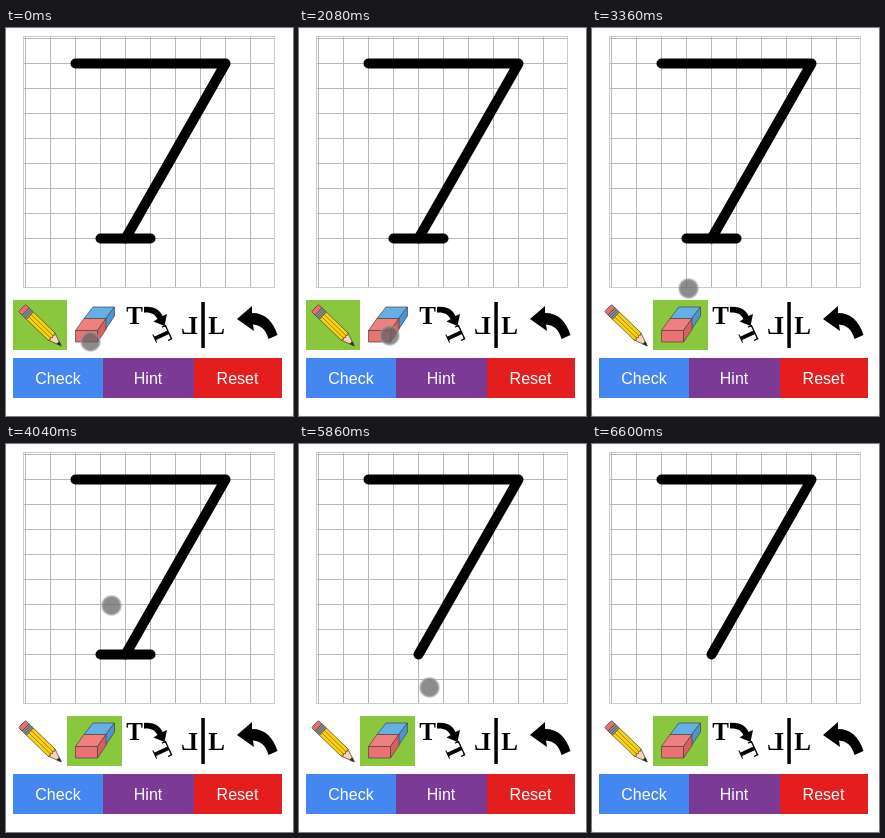
Recreate the animation shown at these times as an HTML page. Size 287x388 px, loop 8190 ms.

```html
<!DOCTYPE html>
<html lang="en">
<head>
<meta charset="utf-8">
<title>Grid drawing tool</title>
<style>
  html, body { margin: 0; width: 100%; height: 100%; overflow: hidden; background: #eee; }
  svg { display: block; width: 287px; height: 388px; }
  .label { font: 16px "Liberation Sans", Arial, sans-serif; fill: #fff; text-anchor: middle; }
  .glyph { font: bold 25px "Liberation Serif", "Times New Roman", serif; text-anchor: middle; }
  .ink { fill: none; stroke: #000; stroke-width: 10; stroke-linecap: round; stroke-linejoin: round; }
  .edge { stroke: #444; stroke-width: .7; stroke-linejoin: round; }

  .anim { animation: 8190ms step-end infinite; }
  #pencil-bg { animation-name: pencil; }
  #eraser-bg { animation-name: eraser; }
  #foot { animation-name: foot; }
  #touch { animation-name: touch; }
  #press { animation-name: press; }

  @keyframes pencil {
    0% { fill: #8bc63f; }
    32.967%, 100% { fill: #fff; }
  }
  @keyframes eraser {
    0% { fill: #fff; }
    31.501% { fill: #dcdcdc; }
    32.967%, 100% { fill: #8bc63f; }
  }
  @keyframes foot {
    0% { opacity: 1; }
    62.026%, 100% { opacity: 0; }
  }
  @keyframes press {
    0% { opacity: 0; }
    31.501% { opacity: .55; }
    32.967%, 100% { opacity: 0; }
  }
  @keyframes touch {
    0% { transform: translate(84.5px, 313.5px); }
    1.587% { transform: translate(87.5px, 305.5px); }
    9.523% { transform: translate(87.5px, 310.5px); }
    25.396% { transform: translate(90.5px, 307.5px); }
    /* up to the board */
    41.025% { transform: translate(96.5px, 260.5px); }
    42.490% { transform: translate(103.5px, 221.5px); }
    44.322% { transform: translate(109.5px, 186.5px); }
    46.153% { transform: translate(111.5px, 172px); }
    47.619% { transform: translate(111.5px, 163px); }
    /* down across the short stroke */
    49.328% { transform: translate(105.5px, 161.5px); }
    50.793% { transform: translate(103px, 166px); }
    52.258% { transform: translate(102px, 176px); }
    53.724% { transform: translate(101.5px, 190px); }
    55.189% { transform: translate(101.5px, 206px); }
    56.654% { transform: translate(101.5px, 222px); }
    58.119% { transform: translate(101.5px, 234.5px); }
    62.026% { transform: translate(107.5px, 226.5px); }
    /* off the bottom */
    71.550% { transform: translate(130.5px, 243.5px); }
    73.260% { transform: translate(134px, 257px); }
    74.725% { transform: translate(143px, 282px); }
    76.190% { transform: translate(155px, 313px); }
    77.655% { transform: translate(167px, 348px); }
    79.120% { transform: translate(176.5px, 379px); }
    80.586%, 100% { transform: translate(180px, 420px); }
  }
</style>
</head>
<body>
<svg viewBox="0 0 287 388">
  <defs>
    <pattern id="grid" x="19" y="10" width="25" height="25" patternUnits="userSpaceOnUse">
      <path d="M.5 0V25M0 .5H25" fill="none" stroke="#b8b8b8"/>
    </pattern>
  </defs>
  <rect width="287" height="388" rx="4" fill="#fff"/>

  <!-- board -->
  <rect x="18" y="9" width="250" height="250" fill="url(#grid)"/>
  <rect x="17.5" y="8.5" width="251" height="251" fill="none" stroke="#ccc"/>
  <path class="ink" d="M69.5 35.5H219.5L119.5 210.5"/>
  <path class="ink anim" id="foot" d="M94.5 210.5H144.5"/>

  <!-- tool backgrounds -->
  <rect class="anim" id="pencil-bg" x="7" y="272" width="54" height="50"/>
  <rect class="anim" id="eraser-bg" x="61" y="272" width="55" height="50"/>

  <!-- pencil -->
  <g class="edge" transform="translate(16 280) rotate(44)">
    <path d="M5-5H1.5Q0-5 0-3.5V3.5Q0 5 1.5 5H5Z" fill="#ea6d6d"/>
    <path d="M5-5H11V5H5Z" fill="#8d9296"/>
    <path d="M7-5V5M9-5V5" fill="none"/>
    <path d="M41-5L54.500 0L41 5Z" fill="#f6d5b0"/>
    <path d="M50-1.700L54.500 0L50 1.700Z" fill="#222"/>
    <path d="M11-5H41L42.500-3.300L41-1.700L42.500 0L41 1.700L42.500 3.300L41 5H11Z" fill="#fbd20c"/>
    <path d="M11-1.700H41M11 1.700H41" fill="none" stroke="#8a6a00"/>
  </g>

  <!-- eraser -->
  <g class="edge">
    <path d="M87 279H108.500L100 290.500H78Z" fill="#66aee6"/>
    <path d="M108.500 279V288L99.500 301.500V290.500Z" fill="#4f93cf"/>
    <path d="M78 290.500H100L91.500 302.500H69.500Z" fill="#ef8080"/>
    <path d="M69.500 302.500H91.500V314H69.500Z" fill="#ea7272"/>
    <path d="M100 290.500V301.500L91.500 314V302.500Z" fill="#d96060"/>
  </g>

  <!-- rotate -->
  <text class="glyph" x="128.500" y="296">T</text>
  <text class="glyph" transform="translate(155.500 307.500) rotate(65)" y="8">T</text>
  <path d="M138 279C148 278 154 282 156.500 288L161 286L158.500 298L147.500 293.500L151.500 291C149 286 145 284 138 284.500Z"/>

  <!-- mirror -->
  <path d="M195.300 274H198.800V320H195.300Z"/>
  <text class="glyph" x="210.500" y="306">L</text>
  <text class="glyph" transform="translate(183.500 306) scale(-1 1)">L</text>

  <!-- undo -->
  <path d="M231 291L246 278V285C259 285 267 293 271.500 307L262.500 311C260 302 255 297 247 296.500L248 303Z"/>

  <!-- buttons -->
  <path d="M7 330H97V370H7Z" fill="#4487f0"/>
  <path d="M97 330H188V370H97Z" fill="#7b3a96"/>
  <path d="M188 330H276V370H188Z" fill="#e41e1e"/>
  <text class="label" x="52" y="356">Check</text>
  <text class="label" x="142" y="356">Hint</text>
  <text class="label" x="231.500" y="356">Reset</text>

  <!-- touch point -->
  <g class="anim" id="touch">
    <circle r="9.200" fill="#646464" fill-opacity=".74" stroke="#9a9a9a" stroke-opacity=".65" stroke-width="2"/>
    <circle class="anim" id="press" r="6" fill="#3a3030"/>
  </g>
</svg>
</body>
</html>
```
